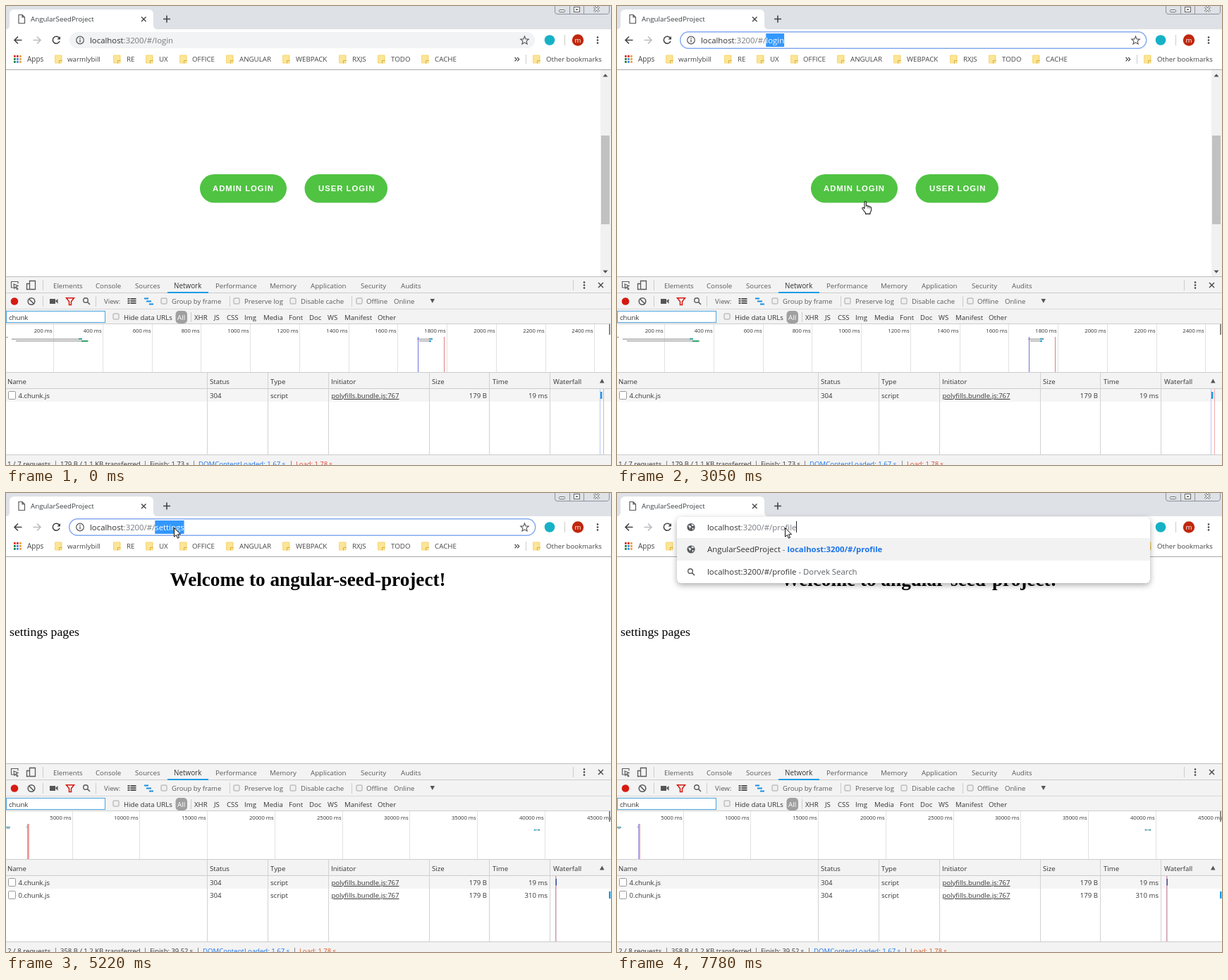
Write an HTML page that moves like this. It is 858x652 px and loops after 8000 ms.

```html
<!DOCTYPE html>
<html lang="en">
<head>
<meta charset="utf-8">
<title>Lazy loaded routes</title>
<style>
html, body { margin: 0; width: 100%; height: 100%; overflow: hidden; background: #fff; }
svg { display: block; width: 858px; height: 652px; }
text { font-family: "Open Sans", "Noto Sans", sans-serif; white-space: pre; font-variant-ligatures: none; }
.serif { font-family: "Liberation Serif", serif; }
.btn { font-family: "Liberation Sans", sans-serif; font-weight: 700; letter-spacing: 1px; }
.b { font-weight: 700; }
#drop rect:first-child { filter: drop-shadow(0 3px 4px rgba(0, 0, 0, .32)); }
</style>
</head>
<body>
<svg id="stage" viewBox="0 0 858 652"></svg>
<script>
const INK = '#333', GREY = '#5f6368', LINE = '#ccc', BAR = '#f3f3f3', BLUE = '#1a73e8', SEL = '#3297fd';

const text = (x, y, s, size = 9.65, fill = INK, attr = '') =>
  `<text x="${x}" y="${y}" font-size="${size}" fill="${fill}" ${attr}>${s}</text>`;
const rect = (x, y, w, h, fill, attr = '') =>
  `<rect x="${x}" y="${y}" width="${w}" height="${h}" fill="${fill}" ${attr}/>`;
const circle = (x, y, r, fill, attr = '') => `<circle cx="${x}" cy="${y}" r="${r}" fill="${fill}" ${attr}/>`;
const path = (d, stroke, w = 1, fill = 'none') =>
  `<path d="${d}" stroke="${stroke}" stroke-width="${w}" fill="${fill}"/>`;
const vline = (x, y1, y2, c = LINE) => path(`M${x} ${y1}V${y2}`, c);
const group = (id, body) => `<g id="${id}">${body}</g>`;
const labels = (list, y, size, fill) => list.map(([x, s]) => text(x, y, s, size, fill)).join('');
const end = 'text-anchor="end"';

const folder = x => rect(x, 69.5, 10.5, 12, '#f7d774', 'rx="1"') +
  rect(x + 1, 70.5, 8, 10, '#fbe596') + path(`M${x + 6.5} 81.5v-4h4`, '#d9ad3c');
const check = (x, y) => rect(x - 4, y - 4, 8, 8, '#f0f0f0', 'stroke="#a6a6a6" rx="1"');
const dots = (x, y, step = 4) => [-step, 0, step].map(d => circle(x, y + d, 1.3, '#444')).join('');
const lens = (x, y) => circle(x - 1, y - 1, 3.3, 'none', 'stroke="#5a5a5a" stroke-width="1.4"') +
  path(`M${x + 1.5} ${y + 1.5}l3.5 3.5`, '#5a5a5a', 1.6);
const globe = y => circle(105, y, 5.6, '#55585c') +
  path(`M101 ${y - 2.5}l3 .5 1.5 2 -2 1 .5 2.5zM106 ${y - 4.5}l-.5 2 2 1 2-1zM106.5 ${y + 1}l2.5 .5 -2 2.5z`, 'none', 0, '#fff');
const docIcon = y => rect(3.5, y - 5.5, 10, 11, '#fff', 'stroke="#999" rx="1"');

function chrome() {
  const marks = [[87, 'warmlybill'], [171, 'RE'], [217, 'UX'], [264, 'OFFICE'], [331, 'ANGULAR'],
    [411, 'WEBPACK'], [491, 'RXJS'], [546, 'TODO'], [608, 'CACHE']];
  const dotsGrid = ['#d93025', '#d93025', '#e8a33d', '#188038', '#4285f4', '#e8a33d', '#188038', '#4285f4', '#e8a33d'];
  return rect(0, 0, 858, 33, '#dee1e6') +
    path('M0 33Q5 33 5 27V12Q5 5 12 5H202Q209 5 209 12V27Q209 33 215 33Z', 'none', 0, '#fff') +
    path('M778.5 0V8Q778.5 11.5 782 11.5H851Q855.5 11.5 855.5 8V0M799.5 0V11.5M819.5 0V11.5', '#8f949b') +
    rect(784.5, 5.5, 8, 3, '#fff', 'stroke="#666" rx="1"') +
    rect(805.5, 1.5, 8, 7, '#fff', 'stroke="#666"') + rect(808, 4, 3, 2, '#777') +
    path('M834 1l7 7M841 1l-7 7', '#666', 3) + path('M834 1l7 7M841 1l-7 7', '#fff', 1.3) +
    path('M18 12.5h5l3.5 3.5v8.5h-8.5zM23 12.5v3.5h3.5', '#5a5a5a', 1.2) +
    text(35, 22, 'AngularSeedProject', 9.8, '#3c4043') +
    path('M192 15.5l6.5 6.5M198.5 15.5l-6.5 6.5', '#444', 1.4) +
    path('M223 18.5h10M228 13.5v10', '#444', 1.6) +
    rect(0, 33, 858, 58, '#fff') +
    path('M22.5 48.5H12M17 43.5l-5 5 5 5', '#444', 1.6) +
    path('M38.5 48.5H49M44 43.5l5 5 -5 5', '#b9bcc0', 1.6) +
    path('M75.5 45.5A5 5 0 1 0 76 50', '#444', 1.6) + path('M77 43v4.5h-4.5z', 'none', 0, '#444') +
    rect(90, 37, 660, 23, '#f1f3f4', 'rx="11.5"') +
    rect(89.75, 36.75, 661, 23.5, '#fff', 'id="ring" rx="11.7" stroke="#84aaee" stroke-width="1.5"') +
    circle(105, 48.5, 5.3, 'none', 'stroke="#555" stroke-width="1.2"') +
    path('M105 47.5v4M105 45v1.4', '#555', 1.3) +
    path('M735.5 43l1.6 3.9 4.2.3 -3.2 2.7 1 4.1 -3.6-2.2 -3.6 2.2 1-4.1 -3.2-2.7 4.2-.3z', '#555', 1.1) +
    circle(771, 48.5, 7.3, '#17b1c6') + vline(792.5, 41, 56) +
    circle(811, 48.5, 8.2, '#c0270d') + text(811, 51.7, 'm', 9.6, '#fff', 'text-anchor="middle"') +
    dots(839, 48.5) +
    dotsGrid.map((c, i) => rect(11 + i % 3 * 4, 70 + (i / 3 | 0) * 4, 2.8, 2.8, c)).join('') +
    text(30, 79.3, 'Apps', 10, '#444') +
    [69, 152, 198, 246, 312, 392, 472, 527, 589, 747].map(folder).join('') +
    labels(marks, 79.3, 9.75, '#444') + text(766, 79.3, 'Other bookmarks', 9.62, '#444') +
    path('M721.5 73l2.7 2.7 -2.7 2.7M725 73l2.7 2.7 -2.7 2.7', '#444', 1.2) + vline(737.5, 69, 82) +
    rect(0, 90, 858, 1, '#a9a9a9');
}

const pill = (x, w, tx, s) => rect(x, 239, w, 40.5, '#50c343', 'rx="20.2"') +
  text(tx, 262.8, s, 11.3, '#fff', 'class="btn"');

function loginPage() {
  return rect(843, 91, 15, 293, '#f1f1f1') + rect(844, 184, 12, 126, '#c1c1c1') +
    path('M846.5 100.5h7l-3.5-4zM846.5 375.5h7l-3.5 4z', 'none', 0, '#505050') +
    pill(275, 123, 293, 'ADMIN LOGIN') + pill(423.5, 117.5, 443, 'USER LOGIN');
}

function settingsPage() {
  return text(232.5, 132, 'Welcome to angular-seed-project!', 27.2, '#000', 'class="serif b"') +
    text(5, 203, 'settings pages', 17.73, '#000', 'class="serif"');
}

function devtools() {
  const tabs = [[67, 'Elements'], [127, 'Console'], [183, 'Sources'], [297, 'Performance'],
    [374, 'Memory'], [432, 'Application'], [503, 'Security'], [560, 'Audits']];
  const types = [[267, 'XHR'], [295, 'JS'], [313, 'CSS'], [338, 'Img'], [365, 'Media'], [401, 'Font'],
    [430, 'Doc'], [456, 'WS'], [480, 'Manifest'], [527, 'Other']];
  const tools = [[139, 'View:'], [235, 'Group by frame'], [338, 'Preserve log'], [418, 'Disable cache'],
    [511, 'Offline'], [550, 'Online']];
  const heads = [[2, 'Name'], [289, 'Status'], [375, 'Type'], [461, 'Initiator'], [604, 'Size'], [690, 'Time'], [776, 'Waterfall']];
  return rect(0, 384, 858, 268, '#fff') + rect(0, 384, 858, 68, BAR) +
    rect(0, 384, 858, 1, '#bdbdbd') + rect(0, 407, 858, 1, LINE) +
    rect(0, 430, 858, 1, '#d8d8d8') + rect(0, 451, 858, 1, LINE) +
    path('M14 400h-6.5v-8.5h9.5v3M11 395l6 2.5 -2.5 1 2.5 3.5 -1.2.8 -2.4-3.4 -1.6 1.8z', '#5a5a5a', 1.1) +
    path('M32.5 402.5h-3v-8h4M33.5 390.5h8v12h-8z', '#5a5a5a', 1.3) + vline(52.5, 389, 404) +
    labels(tabs, 400.5, 9.7, '#5a5a5a') + text(238, 400.5, 'Network', 9.9, INK) +
    rect(229, 406, 58, 2, '#1a9be6') +
    vline(804.5, 389, 404) + dots(820, 396.5) + path('M840 393l7 7M847 393l-7 7', '#444', 1.4) +
    circle(12, 419.5, 5.3, '#d61a12') +
    circle(36, 419.5, 4.8, 'none', 'stroke="#555" stroke-width="1.5"') + path('M32.8 416.2l6.5 6.5', '#555', 1.5) +
    vline(52.5, 412, 427) + rect(62, 416, 8, 7, '#555') + path('M70 419l3.5-3v7z', 'none', 0, '#555') +
    path('M85.5 414.8h11l-4 5v4.6h-3v-4.6z', '#d61a12', 1.5) + lens(114, 419) + vline(127.5, 412, 427) +
    [416, 419, 422].map(y => rect(172.5, y - 1, 3, 2, '#555') + rect(176.5, y - 1, 8, 2, '#555')).join('') +
    path('M196 415.5h6M199 419.5h7M203 423.5h6', '#1a8fe0', 2) +
    check(224, 419) + vline(317.5, 412, 427) + check(327, 419) + check(407, 419) + vline(490.5, 412, 427) + check(501, 419) +
    labels(tools, 423.3, 9.6, '#5a5a5a') + path('M601.5 416h6.5l-3.2 6z', 'none', 0, '#555') +
    rect(.5, 433.5, 140, 16, '#fff', 'stroke="#4aa3df"') + text(4, 446, 'chunk') +
    check(156, 441) + text(167, 446, 'Hide data URLs', 9.7) +
    rect(240.5, 433, 16.5, 18, '#a0a0a0', 'rx="5"') + text(243, 446, 'All', 9.8, '#fff') + vline(262.5, 435, 449) +
    labels(types, 446, 9.65, INK) +
    group('timeA', timeline(67.5, 69.75, 200) +
      rect(8, 472.5, 96, 1.5, '#aaa') + rect(103, 472, 5, 2, '#3a9e94') +
      rect(14, 475, 94, 1.5, '#aaa') + rect(107, 475, 9.5, 2, '#34a26c') + rect(0, 470, 3, 1, '#999') +
      rect(583, 472.5, 18, 1.5, '#aaa') + rect(600, 472, 5, 2, '#4a9bb0') + rect(586, 475, 17, 1.5, '#aaa') + rect(600, 475, 3, 2, '#1a9be6') +
      vline(584.5, 470, 520, '#7272dc') + vline(621.5, 470, 520, '#dc7f7f')) +
    group('timeB', timeline(94, 95.75, 5000) +
      rect(0, 474, 6, 1.5, '#4a9bb0') + rect(1, 476, 4, 1.2, '#aaa') + rect(29.5, 473, 3, 3, '#4a9bb0') +
      rect(30, 470, 1, 50, '#a3a3ee') + rect(31, 470, 2, 50, '#f0a0a0') +
      rect(748.5, 478, 8.5, 1.2, '#7fa9bb') + rect(749, 477.6, 1.5, 2, '#1a9be6') + rect(755, 477.6, 2, 2, '#3a9e94')) +
    rect(855, 452, 2, 15, '#8a8a8a') +
    rect(0, 520, 858, 24, BAR) + rect(0, 520, 858, 1, LINE) + rect(0, 543, 858, 1, LINE) +
    labels(heads, 536.5, 9.65, INK) + path('M842 535.5h6.5l-3.2-6z', 'none', 0, '#555') +
    rect(0, 544, 858, 18, '#f5f5f5') +
    [285.5, 371.5, 457.5, 600.5, 685.5, 771.5].map(x => vline(x, 521, 637, '#d2d2d2')).join('') +
    row(557, '4', '19 ms') +
    group('waterA', vline(842.5, 544, 637, '#b9c4f2') + vline(847.5, 544, 637, '#f3a9a9') + rect(843, 548, 2.4, 10, '#1a9be6')) +
    group('waterB', row(575, '0', '310 ms') + rect(779, 544, 1.5, 93, '#cf97ae') + rect(779.5, 548, 1.5, 9.5, '#3c5fa8')) +
    rect(855, 566, 2.5, 10, '#1a9be6', 'id="bar"') +
    rect(0, 638, 858, 14, BAR) + rect(0, 637, 858, 1, LINE) +
    group('statA', status('1 / 7 requests', '179 B / 1.1 KB transferred', 'Finish: 1.73 s', [77, 204, 273, 411], '#e0432c')) +
    group('statB', status('2 / 8 requests', '358 B / 1.2 KB transferred', 'Finish: 39.52 s', [77, 204, 279, 416], '#d9541e'));
}

function timeline(x0, step, unit) {
  let out = '';
  for (let i = 0; x0 + i * step < 862; i++) {
    const x = Math.floor(x0 + i * step) + .5;
    out += vline(x, 452, 520, '#e2e2e2') + text(x - 1.8, 464, `${unit * (i + 1)} ms`, 7.7, INK, end);
  }
  return out;
}

const row = (y, n, time) => docIcon(y - 4) + text(17.5, y, `${n}.chunk.js`, 9.5) + text(289, y, '304') + text(375, y, 'script') +
  text(461.5, y, 'polyfills.bundle.js:767', 9.55, INK, 'text-decoration="underline"') +
  text(682, y, '179 B', 9.6, INK, end) + text(768, y, time, 9.6, INK, end);

const status = (req, size, fin, [a, b, c, d], loadColor) =>
  text(2, 653.5, req, 9.7) + text(a, 653.5, size, 9.5) + text(b, 653.5, fin, 9.4) +
  text(c, 653.5, 'DOMContentLoaded: 1.67 s', 9.6, BLUE) + text(d, 653.5, 'Load: 1.78 s', 9.4, loadColor) +
  [a, b, c, d].map(x => vline(x - 6.5, 646, 652, '#888')).join('');

function dropdown() {
  return rect(85, 34, 671, 94, '#fff', 'rx="6"') + rect(85, 64, 671, 32, '#f2f2f2') +
    globe(48.5) + globe(80) + lens(105, 112) +
    text(128, 84, '', 11.36, INK, 'id="hint"') + text(128, 116, '', 11.36, INK, 'id="query"');
}

const $ = id => document.getElementById(id);
$('stage').innerHTML = chrome() + group('login', loginPage()) + group('settings', settingsPage()) +
  group('wait', path('M0 366.5H279Q282.5 366.5 282.5 370V384H0', '#c8c8c8', 1, '#fff') + text(1, 379.5, 'Connecting...', 9.7, GREY)) +
  devtools() + group('drop', dropdown()) +
  text(119, 52.5, '', 11.36, INK, 'id="url"') + rect(0, 39, 0, 19, SEL, 'id="sel"') +
  text(0, 52.5, '', 11.36, '#fff', 'id="picked"') + rect(0, 40, 1, 16, '#222', 'id="caret"') +
  circle(0, 0, 10, '#f2e12c', 'id="halo" opacity=".5"') +
  group('arrow', path('M.5 .5V13.2L3.4 10.5 5.4 15.2 7.5 14.3 5.5 9.8H9.5Z', '#111', 1, '#fff')) +
  group('hand', path('M4 10V2Q4 .6 5.2 .6T6.4 2V7Q8.6 5.8 9 7.6 11 6.6 11.4 8.3 13.5 7.8 13.5 9.8V13Q13.5 15 12 16.5V18.4H5.5V16.8Q3.5 14.5 1 11 .4 9.6 1.6 9.2 3 9 4 11Z', '#222', 1.1, '#fff') +
    path('M9 7.6V10.5M11.4 8.3V10.5', '#222', .8));

// start, end, steps, from x y, to x y
const legs = [
  [290, 770, 7, 790, 494, 300, 72], [840, 930, 2, 300, 72, 122, 38], [1000, 1080, 2, 122, 38, 229, 47],
  [1550, 2260, 10, 229, 47, 42, 558], [2570, 3050, 7, 42, 558, 347, 277], [3210, 3211, 1, 347, 277, 347, 272],
  [3950, 4510, 8, 347, 272, 240, 44], [4670, 4830, 3, 240, 44, 238, 49]
];
// time of each typed character
const keys = [6070, 6230, 6380, 6610, 6770, 6920, 7000];
const BASE = 'localhost:3200/#/', WORD = 'profile';

const show = (id, on) => $(id).style.display = on ? '' : 'none';
const within = (t, a, b) => t >= a && t < b;

function pointer(t) {
  const leg = legs.filter(l => t >= l[0]).pop();
  if (!leg) return null;
  const [t0, t1, n, x0, y0, x1, y1] = leg;
  const k = Math.min(1, (Math.floor((t - t0) / (t1 - t0) * (n - 1) + .001) + 1) / n);
  const e = k * k * (3 - 2 * k);
  return [x0 + (x1 - x0) * e, y0 + (y1 - y0) * e];
}

function address(t, typed) {
  const open = typed > 0, x = open ? 128 : 119;
  const word = open ? WORD : t < 3450 ? 'login' : 'settings';
  let from = word.length;
  if (open) from = typed;
  else if (within(t, 1320, 3370) || t >= 4990) from = 0;
  const url = $('url');
  url.setAttribute('x', x);
  url.innerHTML = `localhost<tspan fill="#777b80">${BASE.slice(9)}${word}</tspan>`;
  const left = x + url.getSubStringLength(0, BASE.length + from);
  const right = x + url.getComputedTextLength();
  const some = from < word.length;
  // selected letters are drawn only once, in white
  url.lastChild.textContent = BASE.slice(9) + word.slice(0, from);
  show('sel', some);
  show('picked', some);
  $('sel').setAttribute('x', left);
  $('sel').setAttribute('width', right - left);
  $('picked').setAttribute('x', left);
  $('picked').textContent = word.slice(from);
  show('caret', typed === WORD.length && !within(t, 7310, 7780));
  $('caret').setAttribute('x', Math.floor(right));
}

function draw(t) {
  const typed = keys.filter(k => t >= k).length, loaded = t >= 3570;
  show('ring', within(t, 1160, 3370) || t >= 4670);
  show('login', t < 3450);
  show('settings', loaded);
  show('wait', within(t, 3570, 3950));
  ['time', 'water', 'stat'].forEach(id => { show(id + 'A', !loaded); show(id + 'B', loaded); });
  show('bar', t >= 3870);
  show('drop', typed);
  address(t, typed);
  if (typed) {
    $('hint').innerHTML = `AngularSeedProject<tspan fill="${GREY}"> - </tspan><tspan fill="${BLUE}" class="b">${BASE}${WORD.slice(0, typed)}</tspan><tspan fill="${BLUE}">${WORD.slice(typed)}</tspan>`;
    $('query').innerHTML = `${BASE}${WORD.slice(0, typed)}<tspan fill="${GREY}"> - Dorvek Search</tspan>`;
  }
  const p = pointer(t), hand = within(t, 2970, 3950);
  show('arrow', p && !hand);
  show('hand', p && hand);
  show('halo', within(t, 1160, 1390) || within(t, 3370, 3570) || within(t, 4910, 5150));
  if (p) {
    const [x, y] = p.map(Math.round);
    $(hand ? 'hand' : 'arrow').setAttribute('transform', `translate(${x} ${y})`);
    $('halo').setAttribute('transform', `translate(${x + (hand ? 5 : -1)} ${y + 1})`);
  }
}

const start = performance.now();
function tick() {
  draw((performance.now() - start) % 8000);
  requestAnimationFrame(tick);
}
tick();
</script>
</body>
</html>
```
